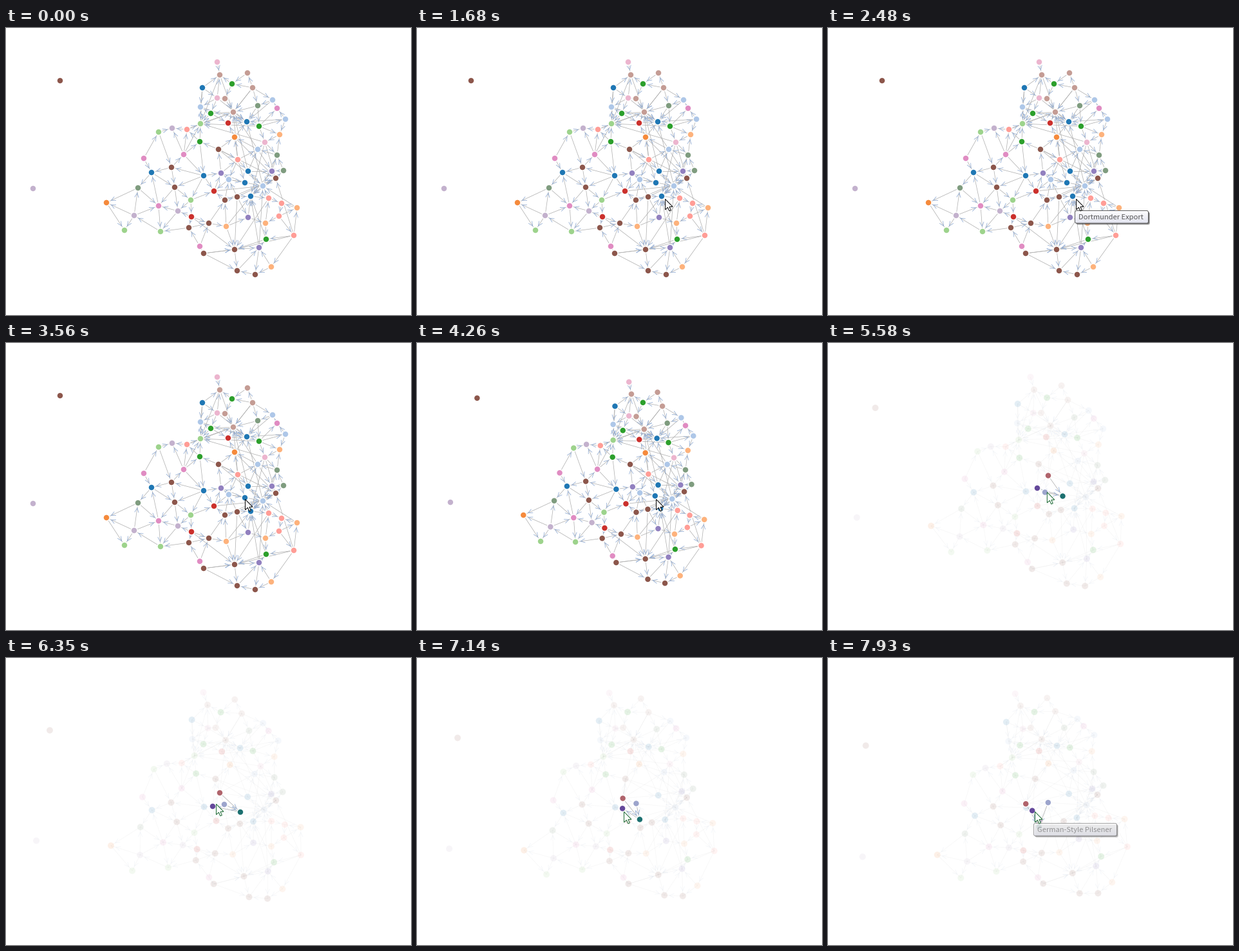
A matplotlib script that plays this animation: 629x447 px, repeating every 8 s.

```python
import matplotlib.pyplot as plt
import numpy as np
from matplotlib.animation import FuncAnimation
from matplotlib.collections import LineCollection
from matplotlib.colors import to_rgb
from matplotlib.patches import FancyBboxPatch, Polygon

W, H, DPI = 629, 447, 64
PX = 72 / DPI            # points per pixel
LOOP, TICK = 8000, 20
DRIFT, STEP, LAST = 4110, 76.4, 51

# ---- network: dots by colour, links by rule ----
nodes, tints = [], []


def add(color, *points):
    nodes.extend(complex(*p) for p in points)
    tints.extend([to_rgb(color)] * len(points))


def find(x, y):
    return int(np.argmin(abs(nodes - complex(x, y))))


add('#8c564b', (84, 82), (330, 189), (257, 217), (262, 248), (340, 268),
    (359, 263), (315, 304), (284, 311), (307, 351), (355, 345), (359, 378),
    (387, 384), (419, 234))
add('#c3b1cd', (42, 250), (258, 156), (267, 285), (199, 292))
add('#9dd38c', (237, 162), (302, 149), (287, 268), (184, 315), (240, 317))
add('#2c9f2c', (351, 87), (318, 133), (301, 177), (393, 153), (404, 329))
add('#1f77b4', (305, 93), (374, 146), (226, 225), (307, 230), (376, 223),
    (371, 241), (380, 262))
add('#aec7e8', (302, 123), (414, 112), (434, 142), (391, 189), (346, 236),
    (399, 246))
add('#ecb5ce', (328, 53), (328, 109), (402, 178))
add('#c49c94', (332, 73), (375, 70), (383, 93), (340, 110), (353, 131))
add('#e08cc2', (421, 125), (276, 197), (214, 203), (237, 277), (301, 340))
add('#ff9d96', (281, 158), (360, 205), (408, 265), (428, 273), (424, 293),
    (447, 323))
add('#7f9c7f', (391, 121), (421, 198), (431, 222), (205, 249))
add('#cb302c', (345, 148), (323, 254), (288, 294))
add('#f58a3c', (355, 170), (156, 272))
add('#fdb27c', (425, 166), (452, 280), (403, 304), (342, 309), (412, 372))
add('#9180bf', (334, 226), (413, 223), (376, 295), (393, 342))
nodes, tints = np.array(nodes), np.array(tints)

HOVER = find(371, 241)
FOCUS = [find(360, 205), find(334, 226), find(346, 236), HOVER]
HUBS = [find(353, 131), find(374, 146), find(302, 149), find(419, 234),
        find(399, 246), find(380, 262), find(355, 345)]


def make_edges(reach=105):
    """Neighbours with a free circle between them, plus long links to hubs."""
    rng = np.random.default_rng(4)
    gap = abs(nodes[:, None] - nodes)
    sq = gap ** 2
    free = (sq[:, None, :] + sq[None, :, :]).min(axis=2) >= sq - 1e-6
    pairs = np.argwhere(np.triu(free & (gap < reach), 1))
    flip = rng.random(len(pairs)) < 0.5
    pairs[flip] = pairs[flip, ::-1]
    links = [tuple(p) for p in pairs]
    for hub in HUBS:
        far = np.flatnonzero((gap[hub] > 45) & (gap[hub] < reach))
        links += [(s, hub) for s in rng.choice(far, 6, replace=False)]
    links = [e for e in links if HOVER not in e]
    a, b, c, _ = FOCUS
    return np.array(links + [(a, HOVER), (HOVER, b), (c, HOVER)])


edges = make_edges()
lit_node = np.isin(np.arange(len(nodes)), FOCUS)
lit_edge = (edges == HOVER).any(axis=1)

# ---- motion ----
PULL, PIVOT = 349 + 190j, 322 + 226j
# places of the hovered dot and its neighbours while the rest turns
KEYS = [3, 10, 30, LAST]
FOCUS_PATH = [[352 + 203j, 329 + 221j, 335 + 237j, 365 + 237j],
              [332 + 210j, 321 + 231j, 339 + 228j, 364 + 240j],
              [306 + 228j, 317 + 238j, 342 + 225j, 326 + 264j]]
GLOW = np.array([to_rgb(c) for c in
                 ('#b0646c', '#64489a', '#9ca4cc', '#1c7070')])


def layout(k):
    """A short inward pull, then a slow turn about the pivot."""
    d = nodes - PULL
    pull = 0.056 * (k / 3 * np.exp(1 - k / 3)) ** 2
    z = nodes - pull * d * np.minimum(1, 180 / abs(d))
    if k > KEYS[0]:
        z = PIVOT + (z - PIVOT) * np.exp(-0.0046j * (k - KEYS[0]))
        path = np.array([layout(KEYS[0])[FOCUS]] + FOCUS_PATH)
        z[FOCUS] = [np.interp(k, KEYS, p) for p in path.T]
    return z


def xy(z):
    return np.stack([z.real, z.imag], axis=-1)


def arrow_heads(z):
    a, b = z[edges].T
    d = (b - a) / abs(b - a)
    tip = b - 8 * d
    back = tip - 7 * d
    return xy(np.stack([back + 3.2j * d, tip, back - 3.2j * d], axis=1))


def rgba(rgb, alpha):
    return np.column_stack([np.broadcast_to(rgb, (len(alpha), 3)), alpha])


def steps(t, start, end, n):
    """Progress 0..1 in n equal jumps, the first at start, the last at end."""
    j = np.floor((t - start) / (end - start) * (n - 1) + 0.07)
    return np.clip(j + 1, 0, n) / n


def drift_step(t):
    return int(np.clip((t - DRIFT + 5) // STEP + 1, 0, LAST))


def cursor_tip(t, k):
    tip = 531 + 445j
    for goal, p in ((389 + 274j, steps(t, 430, 1120, 10)),
                    (385 + 266j, steps(t, 1290, 1680, 6)),
                    (371 + 243j, steps(t, 3010, 3560, 8)),
                    (326 + 227j, np.clip((k - 11) / 13, 0, 1)),
                    (321 + 239j, np.clip((k - 34) / 6, 0, 1))):
        tip += (goal - tip) * p
    return tip


# ---- drawing ----
fig = plt.figure(figsize=(W / DPI, H / DPI), dpi=DPI, facecolor='white')
ax = fig.add_axes([0, 0, 1, 1])


def tooltip(x, y, w, label):
    """Artists of one hint box, each with its full opacity."""
    h = 19.5
    parts = []

    def box(shift, alpha, **style):
        p = FancyBboxPatch((x + shift, y + shift), w, h, zorder=3,
                           boxstyle='round,pad=0,rounding_size=2.5', **style)
        ax.add_patch(p)
        parts.append((p, alpha))
        return p

    box(3, 0.35, fc='#404040', ec='none')
    box(2, 0.6, fc='#404040', ec='none')
    body = box(0.5, 1, fc='white', ec='none')
    ramp = np.linspace(0, 1, 20)[:, None, None]
    image = 1 - ramp * np.array([0.11, 0.105, 0.06])
    shade = ax.imshow(image, extent=(x, x + w + 1, y + h + 1, y),
                      aspect='auto', zorder=3.1)
    shade.set_clip_path(body)
    parts.append((shade, 1))
    box(0.5, 1, fc='none', ec='#606060', lw=PX).set_zorder(3.2)
    text = ax.text(x + 6, y + 14, label, family='Noto Sans CJK JP',
                   fontsize=11.15 * PX, color='#575757', va='baseline',
                   zorder=3.3)
    parts.append((text, 1))
    return parts


def show_tip(parts, level):
    for artist, alpha in parts:
        artist.set_visible(level > 0)
        artist.set_alpha(alpha * level)


first_tip = tooltip(383, 284, 114, 'Dortmunder Export')
second_tip = tooltip(319, 257, 129, 'German-Style Pilsener')

lines = LineCollection([], linewidths=0.75 * PX, zorder=1)
heads = LineCollection([], linewidths=0.75 * PX, zorder=1.5)
ax.add_collection(lines)
ax.add_collection(heads)
dots = ax.scatter(nodes.real, nodes.imag, s=(10 * PX) ** 2,
                  linewidths=1.5 * PX, zorder=2)

ARROW = np.array([(0, 0), (0, 16.5), (3.9, 12.9), (6.4, 18.5), (8.9, 17.4),
                  (6.5, 12), (11.5, 11.8)])
cursor = Polygon(ARROW, closed=True, fc='white', ec='black', lw=PX,
                 joinstyle='miter', zorder=4)
ax.add_patch(cursor)

ax.set_xlim(0, W)
ax.set_ylim(H, 0)
ax.axis('off')


def draw(i):
    t = i * TICK
    k = drift_step(t)
    z = layout(k)
    fade = np.clip((k - 3) / 5, 0, 1)
    rgb = tints.copy()
    rgb[FOCUS] += (GLOW - rgb[FOCUS]) * fade
    node_a = np.where(lit_node, 1, 1 - 0.88 * fade)
    edge_a = np.where(lit_edge, 1, 1 - 0.9 * fade)

    lines.set_segments(xy(z[edges]))
    lines.set_color(rgba(to_rgb('#b0b0b0'), edge_a))
    heads.set_segments(arrow_heads(z))
    heads.set_color(rgba(to_rgb('#8aa6d0'), edge_a))
    dots.set_offsets(xy(z))
    dots.set_facecolor(rgba(rgb, node_a))
    dots.set_edgecolor(rgba((1, 1, 1), node_a))

    cursor.set_visible(t >= 430)
    cursor.set_xy(ARROW + xy(cursor_tip(t, k) + 0.5 + 0.5j))
    cursor.set_edgecolor('#1c6a34' if k >= 20 else 'black')

    leave = min(1, 3 * steps(t, 3010, 3560, 8))
    show_tip(first_tip, steps(t, 2230, 2480, 4) * (1 - leave))
    show_tip(second_tip, max(0, (k - LAST + 3) / 3.5))
    return lines, heads, dots, cursor


anim = FuncAnimation(fig, draw, frames=LOOP // TICK, interval=TICK,
                     repeat=True, repeat_delay=0)
plt.show()
```
